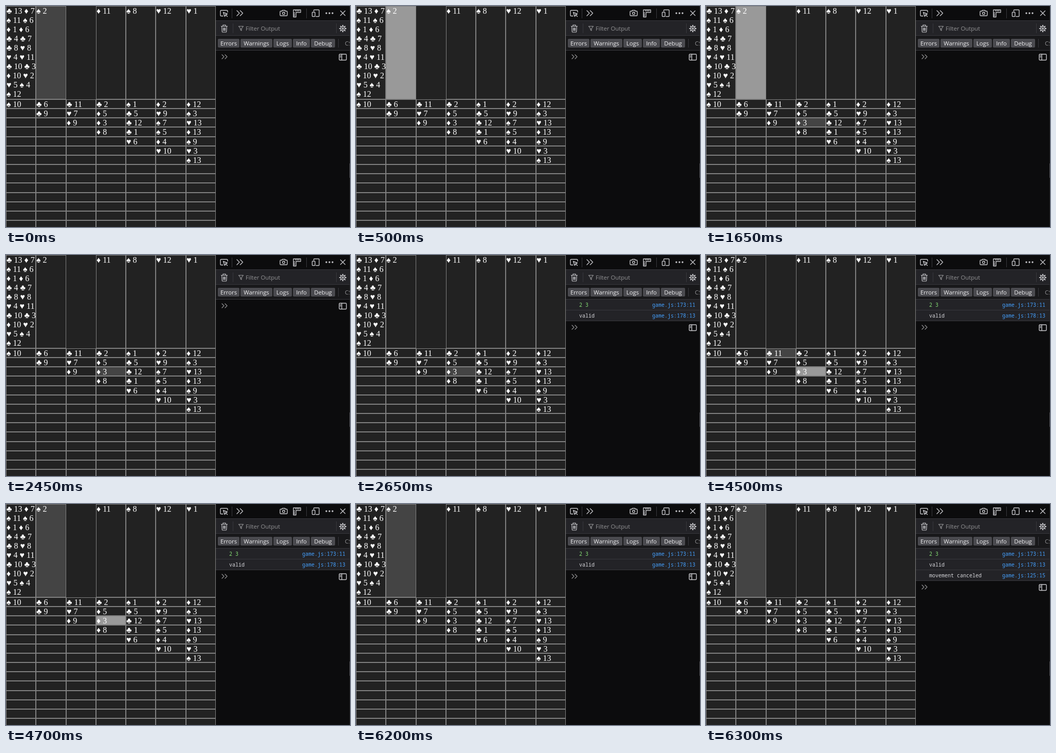
Animation, 669 px wide and 431 px high, one loop 8000 ms. Source, as an HTML page:

```html
<!DOCTYPE html>
<html lang="en">
<head>
<meta charset="utf-8">
<title>Solitaire with console</title>
<style>
  html, body { margin: 0; width: 100%; height: 100%; overflow: hidden; background: #222; }
  #stage { position: relative; width: 669px; height: 431px; overflow: hidden; background: #222; }
  #stage div { position: absolute; box-sizing: border-box; white-space: pre; }

  .cell { border: 1px solid gray; background: #222; color: #fff;
          font: 16px/18px "Liberation Serif", "Times New Roman", serif; }

  #waste, #c2-0, #c3-0, #c3-1, #c3-2, .row, #prompt { animation: 8s step-end infinite; }
  #waste { animation-name: waste; }
  #c2-0 { animation-name: c20; }
  #c3-0 { animation-name: c30; }
  #c3-1 { animation-name: c31; }
  #c3-2 { animation-name: c32; }
  @keyframes waste {
    0% { background: #444; } 6.25% { background: #999; }
    30.625% { background: #222; } 58.75%, 100% { background: #444; }
  }
  @keyframes c20 {
    0%, 18.75%, 56.875%, 100% { background: #222; }
    16.875%, 56.25% { background: #444; }
  }
  @keyframes c30 {
    0%, 56.25%, 100% { background: #222; }
    55.625% { background: #444; }
  }
  @keyframes c31 {
    0%, 20.625%, 55.625%, 100% { background: #222; }
    18.75%, 55% { background: #444; }
  }
  @keyframes c32 {
    0%, 77.5%, 100% { background: #222; }
    20.625% { background: #444; } 48.125% { background: #999; }
  }

  #tools { left: 408px; top: 0; width: 260px; height: 431px; overflow: hidden; background: #0c0c0d;
           font: 11.3px/17px "Open Sans", "Noto Sans", sans-serif; color: #d7d7db; }
  .bar { left: 0; width: 260px; height: 29px; border-bottom: 1px solid #38383d; }
  .tag { top: 64px; height: 17px; border-radius: 2px; background: #4a4a4f; color: #f0f0f2; text-align: center; }
  .row { left: 0; width: 260px; height: 21px; background: #232327; border-bottom: 1px solid #38383d;
         font: 10px/21px "Noto Sans Mono", "DejaVu Sans Mono", monospace; }
  .row div { left: 26px; top: 0; }
  .row .link { left: auto; right: 8px; color: #45a1ff; }
  .row .num { color: #86de74; }
  #r0 { top: 87px; animation-name: r0; }
  #r1 { top: 108px; animation-name: r1; }
  #r2 { top: 129px; animation-name: r2; }
  @keyframes r0 { 0% { visibility: hidden; } 31.25%, 100% { visibility: visible; } }
  @keyframes r1 { 0% { visibility: hidden; } 33.125%, 100% { visibility: visible; } }
  @keyframes r2 { 0% { visibility: hidden; } 78.75%, 100% { visibility: visible; } }
  #prompt { left: 0; width: 260px; height: 24px; animation-name: prompt; }
  @keyframes prompt {
    0% { top: 87px; } 31.25% { top: 108px; } 33.125% { top: 129px; } 78.75%, 100% { top: 150px; }
  }

  svg { position: absolute; left: 0; top: 0; fill: none; stroke: #c6c6ca; stroke-width: 1.4;
        stroke-linecap: round; stroke-linejoin: round; }
  .fill { fill: #c6c6ca; stroke: none; }
  .sep { stroke: #38383d; stroke-width: 1; stroke-linecap: butt; }
  .dim { stroke: #939395; stroke-width: 1.2; }
</style>
</head>
<body>
<div id="stage">
  <div id="tools">
    <div class="bar" style="top:0"></div>
    <div class="bar" style="top:29px;background:#232327"></div>
    <div class="bar" style="top:58px;background:#18181a"></div>
    <div style="left:58px;top:35px;color:#939395">Filter Output</div>
    <div class="tag" style="left:4px;width:42px">Errors</div>
    <div class="tag" style="left:48px;width:62px">Warnings</div>
    <div class="tag" style="left:112px;width:36px">Logs</div>
    <div class="tag" style="left:150px;width:33px">Info</div>
    <div class="tag" style="left:185px;width:47px">Debug</div>
    <div style="left:251px;top:64px;color:#939395">CSS</div>

    <svg width="260" height="87">
      <path class="sep" d="M31.5 5v19M176.5 5v19M33.5 34v19M234.5 34v19M238.5 64v17"/>
      <!-- element picker -->
      <path d="M14 19.500H10.500q-1.500 0-1.500-1.500V10q0-1.500 1.500-1.500H21.500q1.500 0 1.500 1.500V12"/>
      <path d="M14.500 12.500l8 3-3.500 1.500-1.500 3.500zM19.500 17.500l3 3"/>
      <!-- more tabs -->
      <path d="M41 9l5 5-5 5M47.500 9l5 5-5 5"/>
      <!-- camera -->
      <path d="M126.500 10h2l1-1.500h5l1 1.500h2q1.500 0 1.500 1.500v6q0 1.500-1.500 1.500h-11q-1.500 0-1.500-1.500v-6q0-1.500 1.500-1.500z"/>
      <circle cx="132" cy="14.300" r="2.300"/>
      <!-- rulers -->
      <path d="M151 7.500h14v5h-9v9h-5zM155.500 8v2M158.500 8v2M161.500 8v2M151.500 13.500h2M151.500 16.500h2M151.500 19h2"/>
      <!-- responsive mode -->
      <path d="M190.500 10V8.500q0-1 1-1H200q1 0 1 1v11q0 1-1 1H195"/>
      <rect x="187.500" y="12" width="5.500" height="8.500" rx="1"/>
      <g class="fill">
        <circle cx="215" cy="14" r="1.700"/><circle cx="221" cy="14" r="1.700"/><circle cx="227" cy="14" r="1.700"/>
      </g>
      <path d="M242.500 9.500l9 9M251.500 9.500l-9 9"/>
      <!-- bin -->
      <path d="M10.500 39.500h12M14 39v-2h5v2M11.700 40l.6 10q.1 1 1 1h6.400q.9 0 1-1l.6-10M14.700 42.500v5.500M16.500 42.500v5.500M18.300 42.500v5.500" stroke-width="1.2"/>
      <!-- funnel -->
      <path class="dim" d="M44.500 39.500h9l-3.500 4.500v4l-2-1.500v-2.500z"/>
      <!-- gear -->
      <circle cx="247" cy="44" r="4.200"/>
      <circle cx="247" cy="44" r="1.500"/>
      <path id="teeth" stroke-width="2"/>
    </svg>

    <div class="row" id="r0"><div class="num">2 3</div><div class="link">game.js:173:11</div></div>
    <div class="row" id="r1"><div>valid</div><div class="link">game.js:178:13</div></div>
    <div class="row" id="r2"><div>movement canceled</div><div class="link">game.js:125:15</div></div>
    <div id="prompt">
      <svg width="260" height="24">
        <path class="dim" d="M12 8l4 4-4 4M18 8l4 4-4 4"/>
        <rect x="240" y="7" width="14" height="11.500" rx="1.500"/>
        <path d="M245 7v11.500M241.800 10h1.400M241.800 12.500h1.400"/>
      </svg>
    </div>
  </div>
  <div style="left:668px;top:0;width:1px;height:431px;background:#1c1c1e"></div>
  <div style="left:668px;top:307px;width:1px;height:28px;background:#55555a"></div>
</div>
<script>
  const stage = document.getElementById('stage');
  const suits = { c: '♣', d: '♦', h: '♥', s: '♠' };
  const label = s => s.replace(/[cdhs]/g, m => suits[m] + ' ');
  const colX = i => Math.round(i * 408 / 7);
  const rowY = i => i < 0 ? 0 : Math.round(182 + i * 18.16);

  function cell(col, row, text, id) {
    const el = document.createElement('div');
    el.className = 'cell';
    el.id = id || `c${col}-${row}`;
    el.textContent = label(text);
    const x = colX(col), y = rowY(row);
    el.style.cssText = `left:${x}px;top:${y}px;width:${colX(col + 1) - x}px;height:${rowY(row + 1) - y}px`;
    stage.append(el);
  }

  const stock = 'c13 d7,s11 s6,d1 d6,c4 c7,c8 h8,h4 h11,c10 c3,d10 h2,h5 s4,s12';
  cell(0, -1, stock.replace(/,/g, '\n'), 'stock');
  cell(1, -1, 's2', 'waste');
  ['d11', 's8', 'h12', 'h1'].forEach((card, i) => cell(3 + i, -1, card));

  const piles = ['s10', 'c6 c9', 'c11 h7 d9', 'c2 d5 d3 d8', 's1 c5 c12 c1 h6',
                 'd2 h9 s7 s5 d4 h10', 'd12 s3 h13 d13 s9 h3 s13'];
  piles.forEach((pile, col) => {
    const cards = pile.split(' ');
    for (let row = 0; row < 14; row++) cell(col, row, cards[row] || '');
  });

  let teeth = '';
  for (let i = 0; i < 8; i++) {
    const c = Math.cos(i * Math.PI / 4), s = Math.sin(i * Math.PI / 4);
    teeth += `M${247 + 5 * c} ${44 + 5 * s}L${247 + 6.2 * c} ${44 + 6.2 * s}`;
  }
  document.getElementById('teeth').setAttribute('d', teeth);
</script>
</body>
</html>
```
